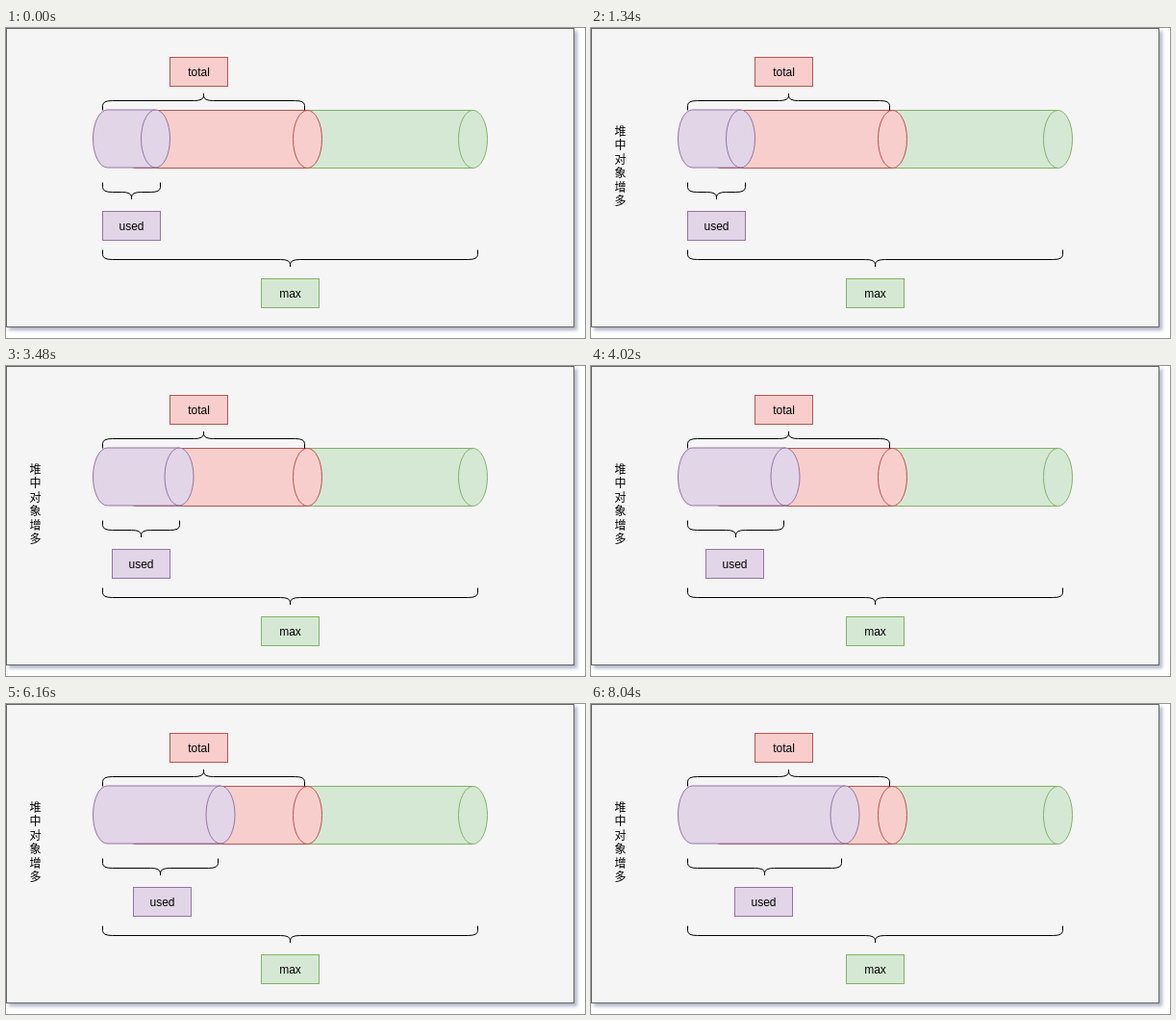
Write an HTML page with a canvas that moves like this. It is 602x322 px and loops after 9.38 s.

```html
<!DOCTYPE html>
<html lang="en">
<head>
<meta charset="utf-8">
<title>Heap memory</title>
<style>
  html, body { margin: 0; width: 100%; height: 100%; overflow: hidden; background: #fff; }
  canvas { display: block; }
</style>
</head>
<body>
<canvas id="stage" width="602" height="322"></canvas>
<script>
const ctx = document.getElementById('stage').getContext('2d');
const STEP_MS = 1340;

const RED = { fill: '#f8cecc', line: '#b85450' };
const GREEN = { fill: '#d5e8d4', line: '#82b366' };
const PURPLE = { fill: '#e1d5e7', line: '#9673a6' };

// Each step: centre of the used lid, left of the used box, right end of the used brace
const STEPS = [
  { lid: 155.5, box: 100.5, brace: 160.5 },
  { lid: 155.5, box: 100.5, brace: 160.5, note: true },
  { lid: 180, box: 110.5, brace: 180.5, note: true },
  { lid: 202, box: 119.5, brace: 200.5, note: true },
  { lid: 223, box: 132.5, brace: 220.5, note: true },
  { lid: 244, box: 141.5, brace: 240.5, note: true },
  { lid: 264, box: 149.5, brace: 260.5, note: true }
];

function setColors({ fill, line }) {
  ctx.fillStyle = fill;
  ctx.strokeStyle = line;
}

function panel() {
  ctx.save();
  ctx.shadowColor = 'rgba(61, 69, 116, 0.4)';
  ctx.shadowBlur = 3.4;
  ctx.shadowOffsetX = ctx.shadowOffsetY = 3;
  ctx.fillStyle = '#f5f5f5';
  ctx.fillRect(0, 0, 591, 311);
  ctx.restore();
  ctx.strokeStyle = '#666666';
  ctx.strokeRect(0.5, 0.5, 590, 310);
}

// Horizontal cylinder between the centres of its two end ellipses
function cylinder(start, end, cy, colors) {
  const rx = 15, ry = 30;
  setColors(colors);
  ctx.beginPath();
  ctx.ellipse(start, cy, rx, ry, 0, Math.PI / 2, Math.PI * 1.5);
  ctx.lineTo(end, cy - ry);
  ctx.ellipse(end, cy, rx, ry, 0, -Math.PI / 2, Math.PI / 2);
  ctx.closePath();
  ctx.fill();
  ctx.stroke();
  ctx.beginPath();
  ctx.ellipse(end, cy, rx, ry, 0, Math.PI / 2, Math.PI * 1.5);
  ctx.stroke();
}

// Curly brace opening at y; dir is 1 for a tip below, -1 for a tip above
function brace(left, right, y, dir) {
  const mid = (left + right) / 2;
  const bar = y + 10 * dir;
  ctx.strokeStyle = '#000';
  ctx.beginPath();
  ctx.moveTo(left, y);
  ctx.lineTo(left, bar - 5 * dir);
  ctx.quadraticCurveTo(left, bar, left + 10, bar);
  ctx.lineTo(mid - 10, bar);
  ctx.quadraticCurveTo(mid, bar, mid, bar + 5 * dir);
  ctx.lineTo(mid, bar + 7.5 * dir);
  ctx.lineTo(mid, bar + 5 * dir);
  ctx.quadraticCurveTo(mid, bar, mid + 10, bar);
  ctx.lineTo(right - 10, bar);
  ctx.quadraticCurveTo(right, bar, right, bar - 5 * dir);
  ctx.lineTo(right, y);
  ctx.stroke();
}

function label(text, x, y, colors) {
  setColors(colors);
  ctx.fillRect(x, y, 60, 30);
  ctx.strokeRect(x, y, 60, 30);
  ctx.fillStyle = '#000';
  ctx.font = '12px "Liberation Sans", Arial, sans-serif';
  ctx.fillText(text, x + 30, y + 19.5);
}

function verticalNote(text, x, y) {
  ctx.fillStyle = '#000';
  ctx.font = '12px "Noto Sans CJK SC", "Noto Sans CJK", sans-serif';
  [...text].forEach((char, i) => ctx.fillText(char, x, Math.round(y + i * 14.4)));
}

function draw({ lid, box, brace: braceEnd, note }) {
  ctx.clearRect(0, 0, 602, 322);
  ctx.lineWidth = 1;
  ctx.textAlign = 'center';
  panel();

  cylinder(220, 485.5, 115.5, GREEN);
  cylinder(135, 313.5, 115.5, RED);
  cylinder(105.5, lid, 115, PURPLE);

  brace(100.5, 310.5, 85.5, -1);
  brace(100.5, braceEnd, 160.5, 1);
  brace(100.5, 490.5, 230.5, 1);

  label('total', 170.5, 30.5, RED);
  label('used', box, 190.5, PURPLE);
  label('max', 265.5, 260.5, GREEN);

  if (note) verticalNote('堆中对象增多', 30.5, 112);
}

const startTime = performance.now();

function tick() {
  const elapsed = performance.now() - startTime;
  draw(STEPS[Math.floor(elapsed / STEP_MS) % STEPS.length]);
  requestAnimationFrame(tick);
}
tick();
</script>
</body>
</html>
```
